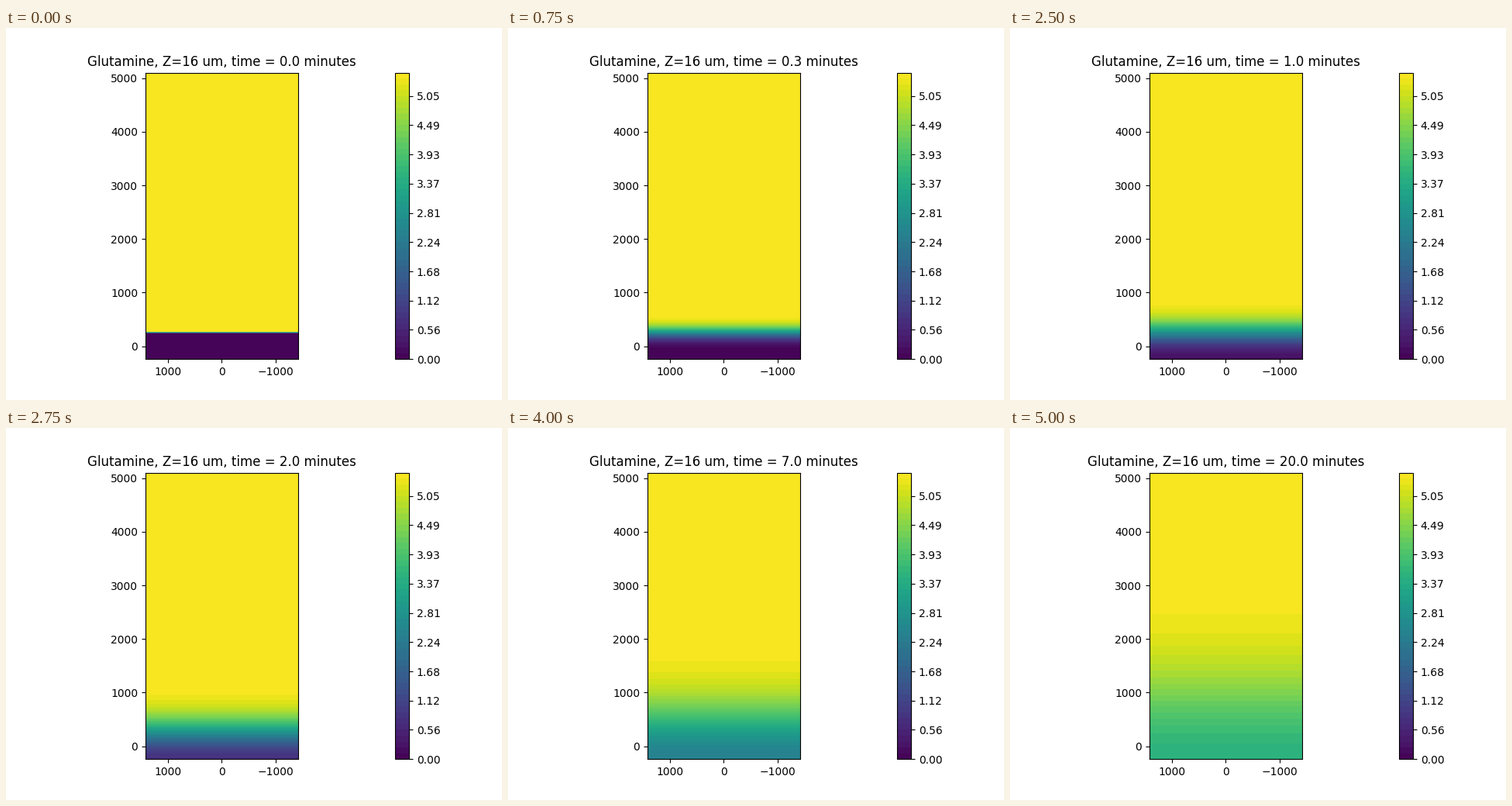
These frames come from a looping animation (640 px wide and 480 px high, 5250 ms). A matplotlib script:

```python
import matplotlib.pyplot as plt
import numpy as np
from matplotlib.animation import FuncAnimation

DX = 32           # voxel size, um
DT = 0.01         # solver step, min
D = 30000         # diffusion coefficient, um^2/min
C0 = 5.5          # starting concentration above the gel
GEL_TOP = 256

x = np.array([-1424, 1424])
y = np.arange(-240, 5105, DX)
levels = np.linspace(0, C0, 50)
times = [k / 10 for k in range(10)] + list(range(1, 11)) + [20]


def implicit_step(n):
    """Backward Euler diffusion step with no-flux ends."""
    lap = 2 * np.eye(n) - np.eye(n, k=1) - np.eye(n, k=-1)
    lap[0, 0] = lap[-1, -1] = 1
    return np.linalg.inv(np.eye(n) + D * DT / DX**2 * lap)


def profiles():
    start = np.where(y > GEL_TOP, C0, 0.0)
    step = implicit_step(len(y))
    out = []
    for t in times:
        c = np.linalg.matrix_power(step, round(t / DT)) @ start
        out.append(np.clip(c, 0, C0))
    return out


conc = profiles()
fig, ax = plt.subplots(figsize=(6.4, 4.8), dpi=100)


def fill(i):
    field = np.column_stack([conc[i], conc[i]])
    return ax.contourf(x, y, field, levels=levels, cmap="viridis")


def draw(i):
    for old in list(ax.collections):
        old.remove()
    ax.set_title(f"Glutamine, Z=16 um, time = {times[i]:.1f} minutes")
    return [fill(i)]


fig.colorbar(fill(0), ax=ax, ticks=levels[::5], format="%.2f")
ax.set_aspect("equal")
ax.set_anchor("C")
ax.set_xlim(x[1], x[0])
ax.set_ylim(y[0], y[-1])
ax.set_xticks([1000, 0, -1000])

anim = FuncAnimation(fig, draw, frames=len(times), interval=250,
                     init_func=lambda: draw(0), repeat=True, repeat_delay=0)
plt.show()
```
